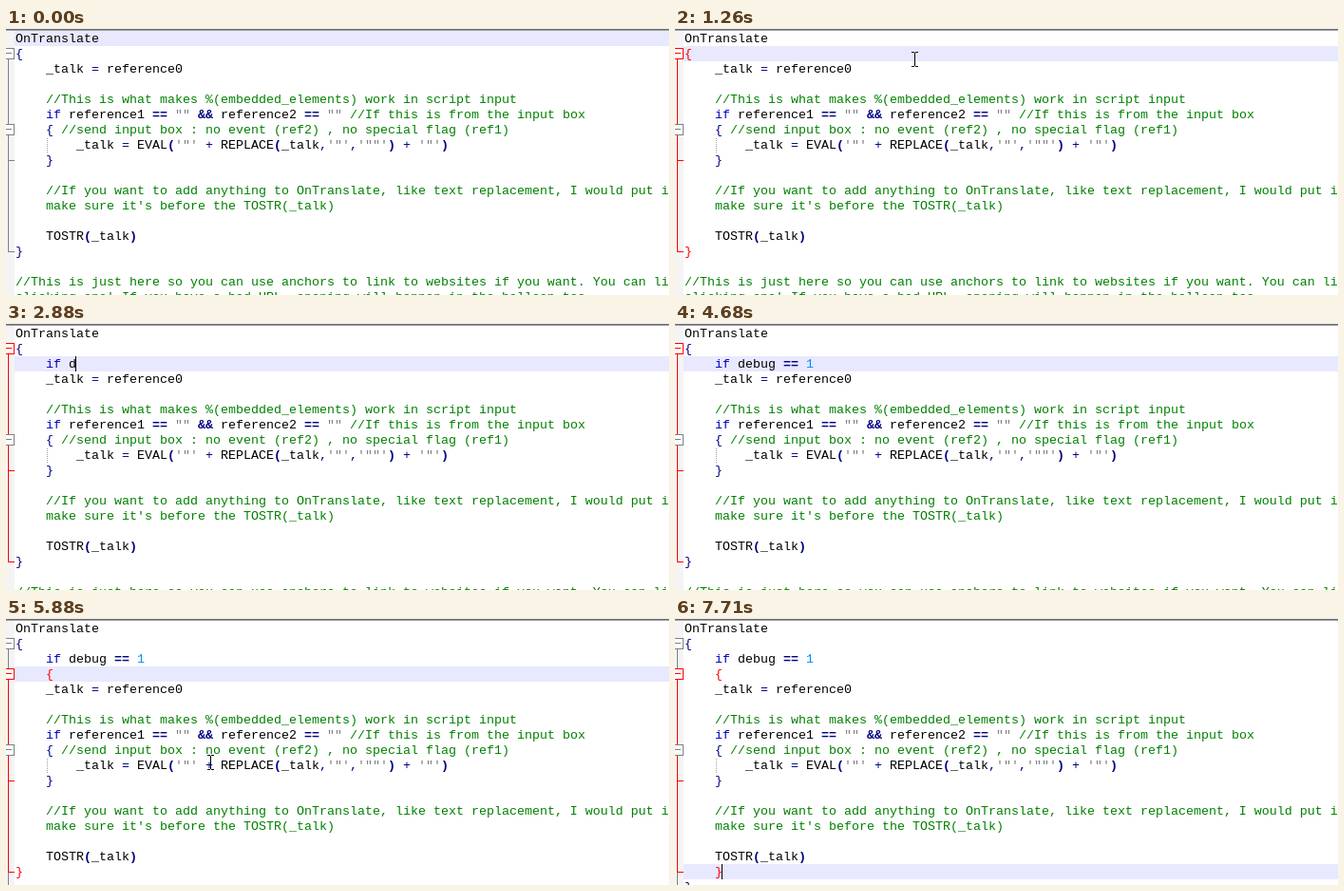
An HTML page that plays this animation: 698 px wide and 281 px high, repeating every 8 s.

```html
<!DOCTYPE html>
<html lang="en">
<head>
<meta charset="utf-8">
<title>Code editor</title>
<style>
html, body { margin: 0; width: 100%; height: 100%; overflow: hidden; background: #fff; }
#stage { position: relative; width: 698px; height: 281px; overflow: hidden; background: #fff; }
#stage > * { position: absolute; }
#margin { left: 0; top: 3px; width: 9px; height: 278px; background: #f4f4f4; }
#edge { left: 0; top: 0; width: 698px; height: 1px; background: #f0f0f0;
  border-bottom: 1px solid #696969; box-shadow: 0 1px #a0a0a0; }
#current { left: 9px; width: 689px; height: 16px; background: #e8e8ff; }
#guide { left: 43px; width: 1px; height: 16px;
  background: repeating-linear-gradient(transparent 0 1px, #a0a0a0 1px 2px); }
#code { left: 10px; top: 4px; margin: 0; color: #000;
  font: 13.3333px/16px "Liberation Mono", "Courier New", monospace; white-space: pre;
  font-variant-ligatures: none; }
#code .comment { color: #008000; }
#code .string { color: #808080; }
#code .sign { color: #000080; }
#code .op { color: #000080; font-weight: bold; }
#code .word { color: #0000c0; }
#code .num { color: #0090ff; }
#code .match { color: #f00; }
#caret { width: 1px; height: 16px; background: #000; }
svg { left: 0; top: 0; shape-rendering: crispEdges; }
</style>
</head>
<body>
<div id="stage">
  <div id="margin"></div>
  <div id="edge"></div>
  <div id="current"></div>
  <div id="guide"></div>
  <pre id="code"></pre>
  <div id="caret"></div>
  <svg width="698" height="281" fill="none">
    <g id="folds"></g>
    <path id="pointer" stroke="#000" d="M-3 -7.5h3M1 -7.5h3M-3 7.5h3M1 7.5h3M.5 -7v14"/>
  </svg>
</div>
<script>
const LOOP = 8000, ROW = 16, COL = 8, TOP = 3, BLINK = 540;
const CLICK_TOP = 690, ENTER_1 = 1380, ENTER_2 = 5010, OPEN = 5340,
      CLICK_END = 6330, ENTER_3 = 7080, CLOSE = 7710;
const TYPED = "if debug == 1";
const KEYS = [2340, 2430, 2550, 2880, 2970, 3270, 3360, 3450, 3600, 3750, 3900, 4020, 4110];

// A leading ~ marks a wrapped comment line.
const SOURCE = `OnTranslate
{
    _talk = reference0

    //This is what makes %(embedded_elements) work in script input
    if reference1 == "" && reference2 == "" //If this is from the input box
    { //send input box : no event (ref2) , no special flag (ref1)
        _talk = EVAL('"' + REPLACE(_talk,'"','""') + '"')
    }

    //If you want to add anything to OnTranslate, like text replacement, I would put it
~    make sure it's before the TOSTR(_talk)

    TOSTR(_talk)
}

//This is just here so you can use anchors to link to websites if you want. You can link
~clicking one! If you have a bad URL, opening will happen in the balloon too`.split("\n");

const TOKEN = /(?<comment>\/\/.*|^~.*)|(?<string>'[^']*'|"[^"]*")|(?<op>==|[()&])|(?<sign>[{}=+,])|(?<word>\bif\b)|(?<num>\b\d+\b)/g;

// Pointer positions: time, x, y
const PATH = [
  [120, 703, 112], [330, 520, 76], [540, 330, 42], [690, 255, 34], [870, 255, 34],
  [900, 252, 33], [5640, 252, 33], [5880, 215, 152], [6180, 180, 244],
  [6330, 177, 248], [6420, 175, 252], [7620, 175, 252], [7710, 174, 254]
];
const SHOWN = [[120, ENTER_1], [1770, 2340], [5640, ENTER_3], [7620, CLOSE]];

const $ = id => document.getElementById(id);
const escapeHtml = s => s.replace(/&/g, "&amp;").replace(/</g, "&lt;");
const span = (cls, s) => `<span class="${cls}">${escapeHtml(s)}</span>`;

function paintLine(text, row, matches) {
  return text.replace(TOKEN, (part, ...rest) => {
    const groups = rest.at(-1), col = rest.at(-3);
    const kind = Object.keys(groups).find(k => groups[k] !== undefined);
    const matched = matches.some(([r, c]) => r === row && c === col);
    return span(matched ? kind + " match" : kind, part.replace(/^~/, ""));
  });
}

function foldShapes({ outer, block, inner, active }) {
  const mid = row => TOP + row * ROW + 8.5;
  const color = name => name === active ? "#f00" : "#808080";
  const line = (d, c) => `<path d="${d}" stroke="${c}"/>`;
  const stem = ([a, b], c) => line(`M2.5 ${mid(a)}V${mid(b)}`, c);
  const tick = (row, c) => line(`M2 ${mid(row)}H9`, c);
  const box = (row, c) =>
    `<rect x="-2.5" y="${mid(row) - 6}" width="11" height="11" fill="#fff" stroke="${c}"/>` +
    line(`M0 ${mid(row) - 1}H6`, c);
  const parts = [["outer", outer], ["block", block], ["inner", inner]].filter(p => p[1]);
  const stems = parts.filter(p => p[0] !== "inner").map(([n, r]) => stem(r, color(n)));
  // The inner fold ends on the stem of the active one and shares its colour.
  const ends = parts.map(([n, r]) =>
    tick(r[1], color(n === "inner" && active ? active : n)) + box(r[0], color(n)));
  return stems.concat(ends).join("");
}

function stateAt(t) {
  const lines = SOURCE.slice();
  const typed = KEYS.filter(k => k <= t).length;
  if (t >= ENTER_1) lines.splice(2, 0, "    " + TYPED.slice(0, typed));
  if (t >= ENTER_2) lines.splice(3, 0, t >= OPEN ? "    {" : "    ");
  if (t >= ENTER_3) lines.splice(16, 0, t >= CLOSE ? "    }" : "    ");

  const shift = (t >= ENTER_1) + (t >= ENTER_2);
  const folds = { outer: [1, 14 + shift], inner: [6 + shift, 8 + shift], active: "" };
  if (t >= CLICK_TOP) folds.active = "outer";
  if (t >= OPEN) {
    folds.active = "block";
    folds.block = [3, t >= ENTER_3 && t < CLOSE ? 17 : 16];
    folds.outer = [1, t >= CLOSE ? 17 : 20];
  }

  let row = 0, col = 0, matches = [];
  if (t >= CLOSE) [row, col, matches] = [16, 5, [[3, 4], [16, 4]]];
  else if (t >= ENTER_3) [row, col] = [16, 4];
  else if (t >= CLICK_END) [row, col, matches] = [15, 16, [[15, 9], [15, 15]]];
  else if (t >= OPEN) [row, col, matches] = [3, 5, [[3, 4], [16, 0]]];
  else if (t >= ENTER_2) [row, col] = [3, 4];
  else if (t >= ENTER_1) [row, col] = [2, 4 + typed];
  else if (t >= CLICK_TOP) [row, col, matches] = [1, 1, [[1, 0], [14, 0]]];
  return { lines, folds, row, col, matches, guide: 7 + shift };
}

const EDITS = [CLICK_TOP, ENTER_1, ...KEYS, ENTER_2, OPEN, CLICK_END, ENTER_3, CLOSE];

function caretOn(t) {
  const last = EDITS.filter(e => e <= t).pop();
  return last !== undefined && Math.floor((t - last) / BLINK) % 2 === 0;
}

function pointerAt(t) {
  const i = PATH.findIndex(p => p[0] > t);
  if (i < 1) return PATH.at(i).slice(1);
  const [t0, x0, y0] = PATH[i - 1], [t1, x1, y1] = PATH[i];
  const k = (t - t0) / (t1 - t0);
  return [x0 + (x1 - x0) * k, y0 + (y1 - y0) * k].map(Math.round);
}

let drawn = -1;

function drawText(t) {
  const edit = EDITS.filter(e => e <= t).length;
  if (edit === drawn) return;
  drawn = edit;
  const s = stateAt(t);
  $("code").innerHTML = s.lines.map((l, i) => paintLine(l, i, s.matches)).join("\n");
  $("folds").innerHTML = foldShapes(s.folds);
  $("current").style.top = $("caret").style.top = TOP + s.row * ROW + "px";
  $("caret").style.left = 9 + s.col * COL + "px";
  $("guide").style.top = TOP + s.guide * ROW + "px";
}

function draw(t) {
  drawText(t);
  $("caret").style.visibility = caretOn(t) ? "visible" : "hidden";
  const shown = SHOWN.some(([a, b]) => t >= a && t < b);
  $("pointer").style.visibility = shown ? "visible" : "hidden";
  $("pointer").setAttribute("transform", `translate(${pointerAt(Math.floor(t / 30) * 30)})`);
}

const start = performance.now();
function tick() {
  draw((performance.now() - start) % LOOP);
  requestAnimationFrame(tick);
}
tick();
</script>
</body>
</html>
```
